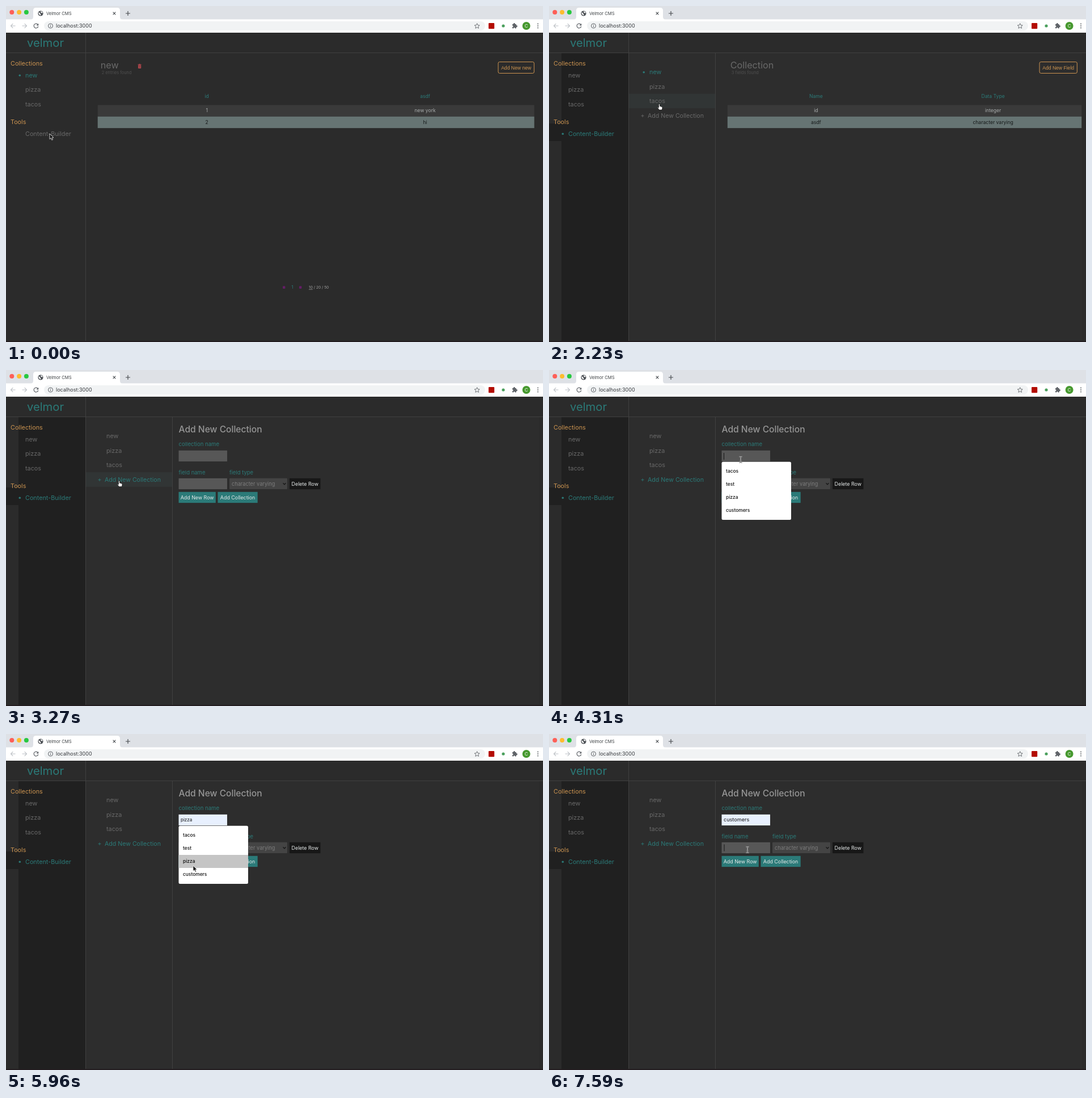
An HTML page that plays this animation: 947x592 px, repeating every 8 s.

```html
<!DOCTYPE html>
<html lang="en">
<head>
<meta charset="utf-8">
<title>Velmor CMS</title>
<style>
html, body { margin: 0; width: 100%; height: 100%; overflow: hidden; background: #2b2b2b; }
svg { display: block; width: 947px; height: 592px; font-family: Inter, "Open Sans", sans-serif; }
.ui { font-family: "Liberation Sans", Arial, sans-serif; }
</style>
</head>
<body>
<svg id="stage" viewBox="0 0 947 592" xmlns="http://www.w3.org/2000/svg"></svg>
<script>
const LOOP = 8000;
const TEAL = '#2b7a78', GREY = '#696969', ORANGE = '#cb9350', ICON = '#5f6368';

const rect = (x, y, w, h, fill, more = '') =>
  `<rect x="${x}" y="${y}" width="${w}" height="${h}" fill="${fill}" ${more}/>`;
const dot = (x, y, r, fill) => `<circle cx="${x}" cy="${y}" r="${r}" fill="${fill}"/>`;
const line = (d, stroke, w = 1, more = '') =>
  `<path d="${d}" fill="none" stroke="${stroke}" stroke-width="${w}" ${more}/>`;
const text = (x, y, str, size, fill, more = '') =>
  `<text x="${x}" y="${y}" font-size="${size}" fill="${fill}" ${more}>${str}</text>`;
const mid = (x, y, str, size, fill, more = '') =>
  text(x, y, str, size, fill, 'text-anchor="middle" ' + more);
const group = (id, body) => `<g id="${id}">${body}</g>`;

function browser() {
  const lights = ['#fe5f57', '#febc2e', '#28c840'].map((c, i) => dot(10.3 + i * 12.8, 11, 4, c));
  const globe = dot(61, 13, 4.6, '#4d5156') +
    '<path d="M57.6 11.2q2 .2 2.4 1.6t1.3 1.6-.6 2q-2.700-.6-3.200-3.600zM61.600 9.200q2.600.6 3.100 2.400-1 1.300-2 .7t-1.800-1.200z" fill="#fff"/>';
  const puzzle = rect(892.9, 32, 7, 7.4, ICON, 'rx=".8"') + dot(896.3, 31.6, 1.6, ICON) +
    dot(900.3, 35.6, 1.6, ICON) + dot(893.2, 35.8, 1.2, '#fff') + dot(896.3, 39.2, 1.2, '#fff');
  return rect(0, 0, 947, 24, '#dee1e6') + rect(0, 23.5, 947, 23.5, '#fff') + lights.join('') +
    '<path d="M43 24q5 0 5-5V8q0-5 5-5H196q5 0 5 5v11q0 5 5 5z" fill="#fff"/>' + globe +
    text(71, 15.5, 'Velmor CMS', 7.6, '#3c4043') +
    line('M188.700 10.700l4.600 4.600m0-4.600l-4.600 4.600', '#45494d', 1.1) +
    line('M211 13h8m-4-4v8', '#45494d', 1.2) +
    line('M16.500 35h-8m3.800-3.800L8.500 35l3.800 3.800M28.500 35h8m-3.800-3.800l3.800 3.800-3.800 3.800', '#bcc0c5', 1.1) +
    line('M56.200 32.700a3.900 3.900 0 1 0 .6 3.300', ICON, 1.2) +
    `<path d="M57.300 30.700v3.700h-3.700z" fill="${ICON}"/>` +
    rect(67, 27, 778, 16, '#f1f3f4', 'rx="8"') +
    '<circle cx="78.500" cy="35" r="4" fill="none" stroke="#5f6368"/>' +
    line('M78.500 34.400v2.800M78.500 32.500v1', ICON) +
    text(88, 38.2, 'localhost:3000', 9, '#35383c') +
    '<path d="M830.700 30.700l1.300 3 3.200.3-2.400 2.100.7 3.200-2.800-1.700-2.800 1.700.7-3.200-2.400-2.100 3.200-.3z" fill="none" stroke="#5f6368" stroke-width=".9"/>' +
    rect(851, 30, 10.2, 10.2, '#b30b00', 'rx="1"') + dot(877, 35, 2.6, '#4a9f5c') + puzzle +
    dot(917.6, 35, 7, '#47992f') + mid(917.6, 37.8, 'C', 7.8, '#fff') +
    [31.4, 35, 38.6].map(y => dot(938, y, 1, ICON)).join('');
}

function sidebar(active) {
  const item = (y, str) => {
    const on = str === active;
    return (on ? dot(24.3, y - 3.6, 1.8, TEAL) : '') + text(34, y, str, 10.8, on ? TEAL : GREY);
  };
  return text(8, 104.8, 'Collections', 10.8, ORANGE) +
    item(125.8, 'new') + item(151.4, 'pizza') + item(177, 'tacos') +
    text(8, 207.7, 'Tools', 10.8, ORANGE) + item(228.8, 'Content-Builder');
}

// Heading, count, outlined button and a two-column table
function listing(o) {
  const w = o.right - o.left, c1 = o.left + w / 4, c2 = o.left + w * 3 / 4;
  const row = (y, cells, fill) => mid(c1, y, cells[0], 8.6, fill) + mid(c2, y, cells[1], 8.6, fill);
  return text(o.left + 5, 110, o.title, 16.2, GREY) + text(o.left + 7, 120, o.count, 7.4, '#4f4f4f') +
    rect(o.btn, 98.5, 931.3 - o.btn, 20, 'none', `rx="2.500" stroke="${ORANGE}"`) +
    mid((o.btn + 931.3) / 2, 111.7, o.add, 8.6, ORANGE, 'class="ui"') +
    row(161.7, o.head, TEAL) +
    rect(o.left, 174.5, w, 20.3, '#3a3a3a') + rect(o.left, 194.8, w, 20.3, '#667473') +
    row(187.3, o.rows[0], '#a9adad') + row(207.6, o.rows[1], '#151818');
}

function entries() {
  const trash = line('M232.500 103.300h6.200M234.300 102.600h2.600', '#b5484e') +
    rect(233, 104.3, 5.2, 5.6, '#b5484e', 'rx=".7"') + line('M234.800 105.400v3.400m1.700-3.400v3.400', '#5c3032', .6);
  return sidebar('new') +
    listing({ left: 161.7, right: 931.6, title: 'new', count: '2 entries found', btn: 868, add: 'Add New new',
      head: ['id', 'asdf'], rows: [['1', 'new york'], ['2', 'hi']] }) + trash +
    rect(488, 493.5, 4.4, 4.4, '#641e66', 'rx="1"') + rect(517, 493.5, 4.4, 4.4, '#641e66', 'rx="1"') +
    mid(505, 497.6, '1', 8, TEAL) +
    text(534, 498.3, '<tspan text-decoration="underline">10</tspan> / 20 / 50', 6.6, '#a0a0a0');
}

function collections(adding) {
  const tone = adding ? TEAL : GREY;
  return (adding ? '' : dot(167.2, 116.7, 1.8, TEAL)) +
    text(177, 120.3, 'new', 10.8, adding ? GREY : TEAL) +
    text(177, 145.8, 'pizza', 10.8, GREY) + text(177, 171.4, 'tacos', 10.8, GREY) +
    text(161.5, 196.8, '+', 10.6, tone) + text(174, 196.9, 'Add New Collection', 10.6, tone);
}

function form() {
  const button = (x, y, w, str, fill) =>
    rect(x, y, w, 19.3, fill) + mid(x + w / 2, y + 12.7, str, 8.9, '#e6eaea');
  return text(304.5, 110.2, 'Add New Collection', 15.6, '#969696', 'font-weight="500"') +
    text(304.5, 134.3, 'collection name', 9.6, TEAL) +
    rect(304.5, 141.8, 85.5, 19.3, '#575757', 'id="field"') + text(308, 154.2, '', 8, '#111', 'id="value"') +
    text(304.5, 183.7, 'field name', 9.5, TEAL) + text(394, 183.7, 'field type', 9.5, TEAL) +
    rect(304.5, 190.8, 85.5, 19.3, '#575757') +
    rect(394, 190.8, 102, 19.3, '#444', 'rx="1"') + text(398, 204, 'character varying', 9.2, '#7d7d7d') +
    line('M488.500 199.300l2.500 2.500 2.500-2.500', '#181818', 1.3) +
    button(500, 190.8, 54.5, 'Delete Row', '#171717') +
    button(304.5, 214.8, 65.3, 'Add New Row', TEAL) + button(373.5, 214.8, 70.2, 'Add Collection', TEAL);
}

const OPTIONS = ['tacos', 'test', 'pizza', 'customers'];
const menu = () => rect(304.5, 161.8, 122.5, 102.2, '#fff', 'rx="2.500"') +
  rect(304.5, 0, 122.5, 23, '#c5c5c5', 'id="pick"') +
  OPTIONS.map((s, i) => text(312, 181.4 + i * 23, s, 8.4, '#111', 'font-weight="500"')).join('');

const pointers = () =>
  group('arrow', '<path d="M0 0V9.600L2.200 7.600 3.800 11.200 5.500 10.500 3.900 7H6.900Z" fill="#111" stroke="#eee" stroke-width=".8"/>') +
  group('hand', '<path d="M-1 1.200Q0-.6 1 1.200V4.300Q2.200 3.600 2.700 4.700 3.900 4.200 4.200 5.200 5.600 5 5.500 6.600 5.500 9 4.400 10.600H-.2Q-1.500 8.600-2.900 6.700-2.700 5.300-1 6.700Z" fill="#fff" stroke="#111" stroke-width=".7"/>') +
  group('beam', ['#d8d8d8', '#222'].map((c, i) =>
    line('M-2.500-5.500Q0-5.500 0-4Q0-5.500 2.500-5.500M0-4V4M-2.500 5.500Q0 5.500 0 4Q0 5.500 2.500 5.500M-1.300 2H1.300', c, i ? .5 : 1.5)).join(''));

const stage = document.getElementById('stage');
stage.innerHTML = rect(0, 47, 947, 545, '#2b2b2b') +
  group('panels', rect(141, 83, 799, 509, '#2d2d2d') + rect(22, 83, 119, 509, '#202020')) +
  rect(0, 207, 22, 31, '#202020', 'id="patch"') +
  rect(0, 212, 141, 26, '#2d3333', 'id="toolHover"') +
  rect(141, 0, 153, 25.7, '#313535', 'id="rowHover"') +
  line('M0 82.500H947M140.500 47V592', '#404040') +
  mid(69.5, 72, 'velmor', 20.2, TEAL) +
  group('entries', entries()) +
  group('builder', line('M293.500 83V592', '#404040') + sidebar('Content-Builder')) +
  group('fields', collections(false) +
    listing({ left: 314.8, right: 939.2, title: 'Collection', count: '3 fields found', btn: 865, add: 'Add New Field',
      head: ['Name', 'Data Type'], rows: [['id', 'integer'], ['asdf', 'character varying']] })) +
  group('form', collections(true) + form()) +
  group('menu', menu()) +
  rect(0, 0, 1, 12, '#141414', 'id="caret"') +
  rect(0, 590, 947, 2, '#231d20') + browser() + group('pointer', pointers());

const $ = Object.fromEntries([...stage.querySelectorAll('[id]')].map(e => [e.id, e]));
const show = (id, on) => { $[id].style.display = on ? '' : 'none'; };
const set = (id, attrs) => { for (const k in attrs) $[id].setAttribute(k, attrs[k]); };
const at = (steps, t) => steps.findLast(s => s[0] <= t);

// time, x, y, pointer shape
const MOVES = [
  [0, 77, 225, 'arrow'], [600, 77.5, 226.5, 'hand'],
  [1050, 108, 222, 'hand'], [1200, 165, 212, 'arrow'], [1340, 194.5, 207.5, 'arrow'],
  [1790, 194.5, 203, 'hand'], [1940, 194.5, 193, 'hand'], [2090, 194.5, 180, 'hand'],
  [2230, 194.5, 172.5, 'hand'], [2380, 194.5, 170, 'hand'],
  [2670, 195.5, 177, 'hand'], [2820, 198, 190, 'hand'], [2970, 199.5, 195, 'hand'],
  [3570, 212, 192, 'hand'], [3720, 250, 180, 'hand'], [3870, 300, 166, 'arrow'],
  [4010, 330, 159, 'beam'], [4160, 338, 158, 'beam'],
  [5660, 337, 172, 'arrow'], [5810, 334, 203, 'arrow'], [5960, 330, 232, 'arrow'],
  [6260, 329, 241, 'arrow'], [6400, 328, 245, 'arrow'],
  [7000, 330, 240, 'arrow'], [7150, 337, 226, 'arrow'], [7300, 345, 211, 'arrow'],
  [7440, 350, 204, 'beam']
];
// time, x, y; x of 0 hides the caret
const CARETS = [[0, 0, 0], [4310, 308, 146], [4760, 0, 0], [5360, 308, 146], [5660, 0, 0],
  [6700, 354.3, 145.5], [7000, 0, 0], [7590, 308.5, 194.5]];
// time, option under the pointer
const PICKS = [[0, -1], [5660, 0], [5810, 1], [5960, 2], [6260, 3]];

function draw(t) {
  const [, x, y, shape] = at(MOVES, t);
  const [, cx, cy] = at(CARETS, t);
  const pick = at(PICKS, t)[1];
  const built = t >= 600, adding = t >= 3270, filled = t >= 6700;
  const row = Math.floor((y - 103.4) / 25.6);

  show('entries', !built);
  show('panels', built);
  show('builder', built);
  show('fields', built && !adding);
  show('form', adding);
  show('patch', t >= 1200);
  show('toolHover', built && x < 141);
  show('rowHover', x > 141 && x < 294 && row >= 0 && row < 4);
  set('rowHover', { y: 103.4 + row * 25.6 });

  show('menu', t >= 4310 && !filled);
  show('pick', pick >= 0);
  set('pick', { y: 167 + pick * 23 });
  set('field', { fill: pick < 0 ? '#575757' : '#e8f0fe' });
  set('value', { 'font-size': filled ? 9.1 : 8 });
  $.value.textContent = OPTIONS[pick] || '';

  show('caret', cx > 0);
  set('caret', { x: cx, y: cy });
  set('pointer', { transform: `translate(${x} ${y})` });
  for (const s of ['arrow', 'hand', 'beam']) show(s, s === shape);
}

const start = performance.now();
function tick() {
  draw((performance.now() - start) % LOOP);
  requestAnimationFrame(tick);
}
tick();
</script>
</body>
</html>
```
